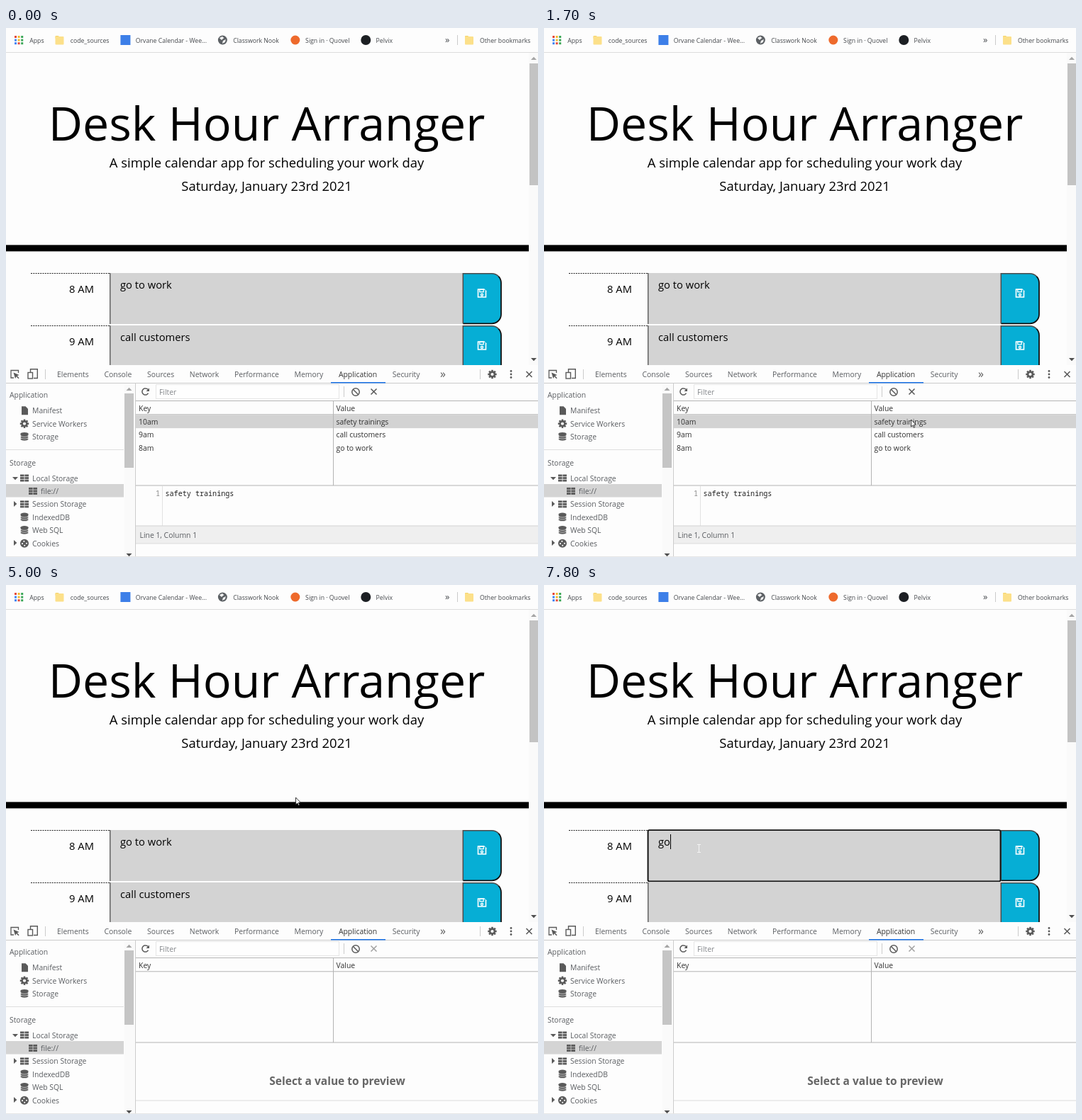
Write an HTML page with a canvas that moves like this. It is 750 by 747 pixels and loops after 8 s.

```html
<!DOCTYPE html>
<html lang="en">
<head>
<meta charset="utf-8">
<title>Day planner with storage panel</title>
<style>
html, body { margin: 0; width: 100%; height: 100%; overflow: hidden; background: #fdfdfd; }
canvas { display: block; width: 750px; height: 747px; }
</style>
</head>
<body>
<canvas id="stage" width="750" height="747"></canvas>
<script>
const ctx = document.getElementById('stage').getContext('2d');
const LOOP = 8000, STEP = 100;
const SANS = '"Open Sans", sans-serif';
const ARIAL = '"Liberation Sans", sans-serif';
const MONO = '"Noto Sans Mono", monospace';
const PAPER = '#fdfdfd', GREY = '#d3d3d3', BLUE = '#1a73e8', ICON = '#5a5a5a';
const LABEL = '#5a5d61', RULE = '#cbcbcb', EDGE = '#b4b4b4';
const UI = 10.4, SMALL = 8.7, BODY = 14.72, LEAD = 18.4, TITLE = 66.24;
const PITCH = 73.6, LINE = 18.45, WHEEL = 92;
const TASKS = ['go to work', 'call customers', 'safety trainings'];

// pointer stops: time, x, y
const STOPS = [
  [0, 340, -30], [700, 316, 324], [1000, 316, 324], [1500, 512, 541], [1700, 517, 553],
  [2000, 470, 611], [2300, 462, 609], [2500, 363, 566], [2700, 492, 505], [2900, 492, 505],
  [3700, 419, 386], [4200, 314, 388], [4400, 330, 452], [5000, 408, 300], [5200, 222, 314],
  [5500, 260, 320], [6000, 218, 372], [LOOP, 218, 372]
];

const ease = (t, a, b) => {
  const u = Math.max(0, Math.min(1, (t - a) / (b - a)));
  return u * u * (3 - 2 * u);
};

function rect(x, y, w, h, color) {
  ctx.fillStyle = color;
  ctx.fillRect(x, y, w, h);
}

const hline = (x, y, w, color = RULE) => rect(x, y, w, 1, color);
const vline = (x, y, h, color = RULE) => rect(x, y, 1, h, color);

// draws a label and returns its width
function text(s, x, y, size = UI, color = LABEL, font = SANS, align = 'left', weight = '') {
  ctx.font = `${weight} ${size}px ${font}`;
  ctx.fillStyle = color;
  ctx.textAlign = align;
  ctx.fillText(s, x, y);
  return ctx.measureText(s).width;
}

function trace(pts) {
  ctx.beginPath();
  for (let i = 0; i < pts.length; i += 2) ctx.lineTo(pts[i], pts[i + 1]);
}

function stroke(color, width = 1) {
  ctx.strokeStyle = color;
  ctx.lineWidth = width;
  ctx.stroke();
}

function fill(color) {
  ctx.fillStyle = color;
  ctx.fill();
}

function line(pts, color, width) {
  trace(pts);
  stroke(color, width);
}

function poly(pts, color) {
  trace(pts);
  ctx.closePath();
  fill(color);
}

function disc(x, y, r, color) {
  ctx.beginPath();
  ctx.arc(x, y, r, 0, 7);
  fill(color);
}

function ring(x, y, r, color, width, from = 0, to = 7) {
  ctx.beginPath();
  ctx.arc(x, y, r, from, to);
  stroke(color, width);
}

function box(x, y, w, h, r, color) {
  ctx.beginPath();
  ctx.roundRect(x, y, w, h, r);
  fill(color);
}

function cross(x, y, color) {
  line([x - 4, y - 4, x + 4, y + 4], color, 1.6);
  line([x - 4, y + 4, x + 4, y - 4], color, 1.6);
}

// triangle pointing down, turned by quarter steps
function wedge(x, y, color, turn = 0) {
  ctx.save();
  ctx.translate(x, y);
  ctx.rotate(turn * Math.PI / 2);
  poly([-4, -2, 4, -2, 0, 2.3], color);
  ctx.restore();
}

function gear(x, y) {
  for (let a = 0; a < Math.PI; a += Math.PI / 4) {
    const dx = Math.cos(a) * 6.2, dy = Math.sin(a) * 6.2;
    line([x - dx, y - dy, x + dx, y + dy], ICON, 2.6);
  }
  ring(x, y, 3.4, ICON, 2.6);
  disc(x, y, 2.1, PAPER);
}

// database: tiers drawn bottom up, each with a pale rim
function stack(x, y) {
  for (const dy of [3.4, 0.6, -2.2, -4]) {
    ctx.beginPath();
    ctx.ellipse(x, y + dy, 5.6, 2.3, 0, 0, 7);
    fill(ICON);
    if (dy > -4) stroke(PAPER, 0.6);
  }
}

function grid(x, y) {
  for (let i = 0; i < 6; i++)
    rect(x - 6 + i % 2 * 6.4, y - 5 + (i >> 1) * 3.6, 5.6, 2.8, ICON);
}

function sheet(x, y) {
  poly([x - 4, y - 6, x + 1.5, y - 6, x + 5, y - 2.5, x + 5, y + 6, x - 4, y + 6], ICON);
}

function cookie(x, y) {
  disc(x, y, 6, ICON);
  for (let a = 0; a < 6; a += 1.5) disc(x + 3 * Math.cos(a), y + 3 * Math.sin(a), 1.1, PAPER);
}

function folder(x) {
  box(x, 11, 5, 4, 1, '#f5d469');
  box(x, 12, 12, 11.5, 1, '#fce08a');
}

function launcher(x) {
  const hues = ['#e5493a', '#f2b92e', '#3aa757', '#4285f4'];
  for (let i = 0; i < 9; i++)
    rect(x + i % 3 * 4.6, 11 + Math.floor(i / 3) * 4.6, 3, 3, hues[(i + (i >> 2)) % 4]);
}

function globe(x) {
  disc(x + 6.5, 17, 6.5, '#5c6064');
  poly([x + 2, 14, x + 6, 12, x + 8.5, 14, x + 5, 17], '#f2f2f2');
  poly([x + 7, 18, x + 11, 16, x + 10, 20, x + 6, 22], '#f2f2f2');
}

function bookmarks() {
  rect(0, 0, 750, 34, PAPER);
  hline(0, 34, 750, '#dcdcdc');
  const items = [
    [launcher, 'Apps'],
    [folder, 'code_sources'],
    [x => rect(x, 10, 14, 14, '#3d7fe8'), 'Orvane Calendar - Wee...'],
    [globe, 'Classwork Nook'],
    [x => disc(x + 7, 17, 6.5, '#ee6a2c'), 'Sign in · Quovel'],
    [x => disc(x + 7, 17, 7, '#1c1f23'), 'Pelvix']
  ];
  let x = 12;
  for (const [icon, name] of items) {
    icon(x);
    x += 37.2 + text(name, x + 21.3, 20.5, SMALL, '#45484c');
  }
  text('»', 619, 20.5, 13, '#45484c');
  vline(636, 10, 14);
  folder(647);
  text('Other bookmarks', 668, 20.5, SMALL, '#45484c');
}

function saveIcon(x, y) {
  poly([x - 6.3, y - 6.3, x + 3.3, y - 6.3, x + 6.3, y - 3.3, x + 6.3, y + 6.3, x - 6.3, y + 6.3], '#fff');
  rect(x - 4.7, y - 4.7, 9.4, 9.4, '#06aed5');
  ctx.strokeStyle = '#fff';
  ctx.lineWidth = 1.3;
  ctx.strokeRect(x - 3.2, y - 5.2, 5.4, 3.4);
  ring(x, y + 2.2, 1.5, '#fff', 1.4);
}

// outset border: lighter on the top and left
function saveButton(y) {
  const l = 644.3, r = 698, t = y + 0.8, b = y + 71.3, k = 13, q = Math.PI / 4;
  box(l, t, r - l, b - t, [0, k, k, 0], '#06aed5');
  ctx.beginPath();
  ctx.arc(r - k, t + k, k, -q, 0);
  ctx.arc(r - k, b - k, k, 0, 2 * q);
  ctx.lineTo(l, b);
  stroke('#111', 1.8);
  ctx.beginPath();
  ctx.moveTo(l, b);
  ctx.lineTo(l, t);
  ctx.arc(r - k, t + k, k, -2 * q, -q);
  stroke('#4c4c4c', 1.5);
}

function hourRow(i, y, s) {
  ctx.setLineDash([2, 1.3]);
  line([35, y + 0.5, 147, y + 0.5], '#222');
  ctx.setLineDash([]);
  if (!s.bare) rect(147, y, 497, 72, GREY);
  vline(146.3, y, 72, '#222');
  text(`${8 + i} AM`, 106.5, y + 28 - s.bare, BODY, '#000', s.font, 'center');
  saveButton(y);
  if (s.bare) return;
  saveIcon(671, y + (i === 2 ? 36 : 28.5));
  const focused = s.focus && i === 0;
  const task = focused ? s.typed : s.reloaded ? '' : TASKS[i] || '';
  const width = text(task, 161, y + 22, BODY, '#000');
  if (!focused) return;
  ctx.beginPath();
  ctx.roundRect(146.5, y + 0.2, 497, 72.2, 2);
  stroke('#111', 1.8);
  if (s.caret) vline(Math.round(161 + width), y + 6, 21, '#000');
}

function page(s) {
  ctx.save();
  ctx.beginPath();
  ctx.rect(0, 35, 750, 441);
  ctx.clip();
  rect(0, 35, 750, 441, PAPER);
  const centred = (str, y, size) => text(str, 367.5, y - s.scroll - s.bare, size, '#000', s.font, 'center');
  centred('Desk Hour Arranger', 159, TITLE);
  centred('A simple calendar app for scheduling your work day', 197, LEAD);
  if (!s.bare) centred('Saturday, January 23rd 2021', 230, LEAD);
  const top = 346 - s.scroll - 33 * s.bare;
  rect(0, top - 39.6, 737, 9, '#000');
  for (let i = 0; i < 4; i++) hourRow(i, Math.round(top + i * PITCH), s);

  rect(737, 35, 13, 441, '#fafafa');
  rect(738, 50 + s.scroll * 0.39, 12, 172 + 6 * s.bare, '#c3c3c3');
  wedge(744, 43, s.scroll ? '#505050' : '#a5a5a5', 2);
  wedge(744, 468, '#505050');
  if (s.bare) {
    box(0, 458, 248, 18, [0, 4, 0, 0], '#dee1e6');
    text('Waiting for quillane.trovelcdn.example...', 2, 470.5, SMALL, '#45484c');
  }
  ctx.restore();
}

function tabs() {
  rect(0, 476, 750, 271, PAPER);
  hline(0, 501, 750);
  line([11, 494, 7, 494, 7, 483.5, 17.5, 483.5, 17.5, 487], ICON, 1.3);
  poly([10.5, 486.5, 18.5, 490, 15, 491.5, 13, 495], ICON);
  line([14, 490.5, 18, 494.8], ICON, 1.6);
  line([34.5, 486, 34.5, 481.8, 44.3, 481.8, 44.3, 494.5, 39, 494.5], ICON, 1.4);
  ctx.strokeRect(31, 486.5, 6.5, 8.5);
  vline(55, 482, 14);
  vline(668, 482, 14);
  let x = 72;
  for (const name of ['Elements', 'Console', 'Sources', 'Network', 'Performance', 'Memory', 'Application', 'Security'])
    x += 21.7 + text(name, x, 493, UI, name === 'Application' ? '#333' : LABEL);
  text('»', 612, 494, 16, ICON);
  rect(458, 500, 77, 1.5, BLUE);
  gear(685.5, 489);
  for (const dy of [-4.5, 0, 4.5]) disc(712, 489 + dy, 1.4, ICON);
  cross(737.5, 489, ICON);
}

function sidebar() {
  rect(0, 644, 166, 18.5, '#d4d4d4');
  const list = (items, y) => items.forEach(([icon, name, indent = 0], i) => {
    const base = y + i * LINE;
    icon(26 + indent, base - 4);
    text(name, 37 + indent, base);
  });
  text('Application', 5, 522.3);
  list([[sheet, 'Manifest'], [gear, 'Service Workers'], [stack, 'Storage']], 544.3);
  hline(0, 595, 166, '#dedede');
  text('Storage', 5, 617.8);
  list([[grid, 'Local Storage'], [grid, 'file://', 12], [grid, 'Session Storage'],
    [stack, 'IndexedDB'], [stack, 'Web SQL'], [cookie, 'Cookies']], 639.5);
  wedge(13, 636, ICON);
  wedge(13, 672, ICON, 3);
  wedge(13, 727, ICON, 3);
  rect(167, 502, 14, 244, '#fafafa');
  rect(167, 516, 13, 105, '#c5c5c5');
  wedge(173.5, 510, '#a5a5a5', 2);
  wedge(173.5, 744, '#505050');
  vline(182, 502, 245);
  hline(0, 746, 750, '#e6e6e6');
}

function cell(str, x, y, lit) {
  ctx.font = `${UI}px ${SANS}`;
  if (lit) rect(x, y - 12.5, ctx.measureText(str).width, 17, '#b3d7fb');
  text(str, x, y, UI, '#303030');
}

function storage(s) {
  ring(196.5, 513.5, 4.6, ICON, 1.5, 0.5, 5.6);
  poly([202, 508.5, 202, 513, 197.5, 513], ICON);
  rect(211, 503, 259, 21, '#e6e6e6');
  rect(212, 504, 257, 19, '#fefefe');
  text('Filter', 216, 518, UI, '#85888c');
  vline(476, 506, 15);
  const tone = s.overBan ? '#222' : ICON;
  ring(493, 514, 5.2, tone, 1.5);
  line([489.5, 510.5, 496.5, 517.5], tone, 1.5);
  cross(518.5, 513.5, s.cleared ? '#a2a2a2' : ICON);

  if (!s.cleared) rect(183, 546.5 + (s.empty ? 3 * LINE : 0), 567, 18.6, s.empty ? BLUE : GREY);
  for (const y of [526, 545.3, 645.5]) hline(183, y, 567, EDGE);
  vline(461, 527, 119, EDGE);
  cell('Key', 187, 540.5);
  cell('Value', 465.5, 540.5);
  if (!s.cleared) TASKS.forEach((task, i) => {
    const y = 560 + (2 - i) * LINE;
    cell(`${8 + i}am`, 187, y, i === 0 && s.marked > 1);
    cell(task, 465.5, y, i < s.marked);
  });

  if (s.empty) {
    text('Select a value to preview', 467, 705.5, 15.5, '#666', SANS, 'center', 'bold');
  } else {
    vline(220, 647, 56, '#e2e2e2');
    text('1', 217, 661, 10.1, '#888', MONO, 'right');
    text(TASKS[2], 224.5, 661, 10.1, '#222', MONO);
    rect(183, 703, 567, 25, '#efefef');
    hline(183, 702.5, 567, '#d4d4d4');
    text('Line 1, Column 1', 188.5, 720);
  }
  hline(183, 727.5, 567, '#dcdcdc');
}

function pointer(t) {
  const i = Math.max(1, STOPS.findIndex(p => p[0] > t));
  const [t0, x0, y0] = STOPS[i - 1], [t1, x1, y1] = STOPS[i];
  const u = ease(t, t0, t1);
  return [x0 + (x1 - x0) * u, y0 + (y1 - y0) * u];
}

function outlined(pts) {
  poly(pts, '#fff');
  ctx.closePath();
  stroke('#222', 0.9);
}

function cursor(x, y, s) {
  const onTask = !s.bare && x > 147 && x < 643 && y < 476 && y + s.scroll >= 346;
  ctx.save();
  ctx.translate(Math.round(x), Math.round(y));
  if (s.overBan) {
    outlined([-1, 0, 1, 0, 1, 4, 5, 5, 6, 7, 5, 11, 4, 14, -2, 14, -5, 9, -4, 8, -1, 10]);
  } else if (onTask) {
    for (const dy of [-5.5, 5.5]) line([-2, dy, 3, dy], '#f4f4f4');
    line([0.5, -5.5, 0.5, 5.5], '#f4f4f4');
  } else {
    outlined([0.5, 0, 0.5, 10, 2.8, 8, 4.3, 11.3, 5.8, 10.6, 4.3, 7.4, 7.3, 7.2]);
  }
  ctx.restore();
}

function state(t) {
  const bare = +(t >= 5500 && t < 5800);
  return {
    scroll: Math.round(WHEEL * (ease(t, 300, 600) - ease(t, 1000, 1300))),
    bare,
    font: bare ? ARIAL : SANS,
    reloaded: t >= 5500,
    focus: t >= 6100,
    caret: t < 6600 || t >= 7100,
    typed: 'go'.slice(0, Math.max(0, t / STEP - 76)),
    cleared: t >= 2900,
    empty: t >= 2000,
    marked: t < 2400 ? 0 : t < 2500 ? 1 : 2,
    overBan: t >= 2700 && t <= 3000
  };
}

function draw(t) {
  const s = state(t);
  bookmarks();
  page(s);
  tabs();
  sidebar();
  storage(s);
  cursor(...pointer(t), s);
}

let shown = -1;
const start = performance.now();
function tick() {
  const t = Math.floor((performance.now() - start) % LOOP / STEP) * STEP;
  if (t !== shown) draw(shown = t);
  requestAnimationFrame(tick);
}
tick();
</script>
</body>
</html>
```
